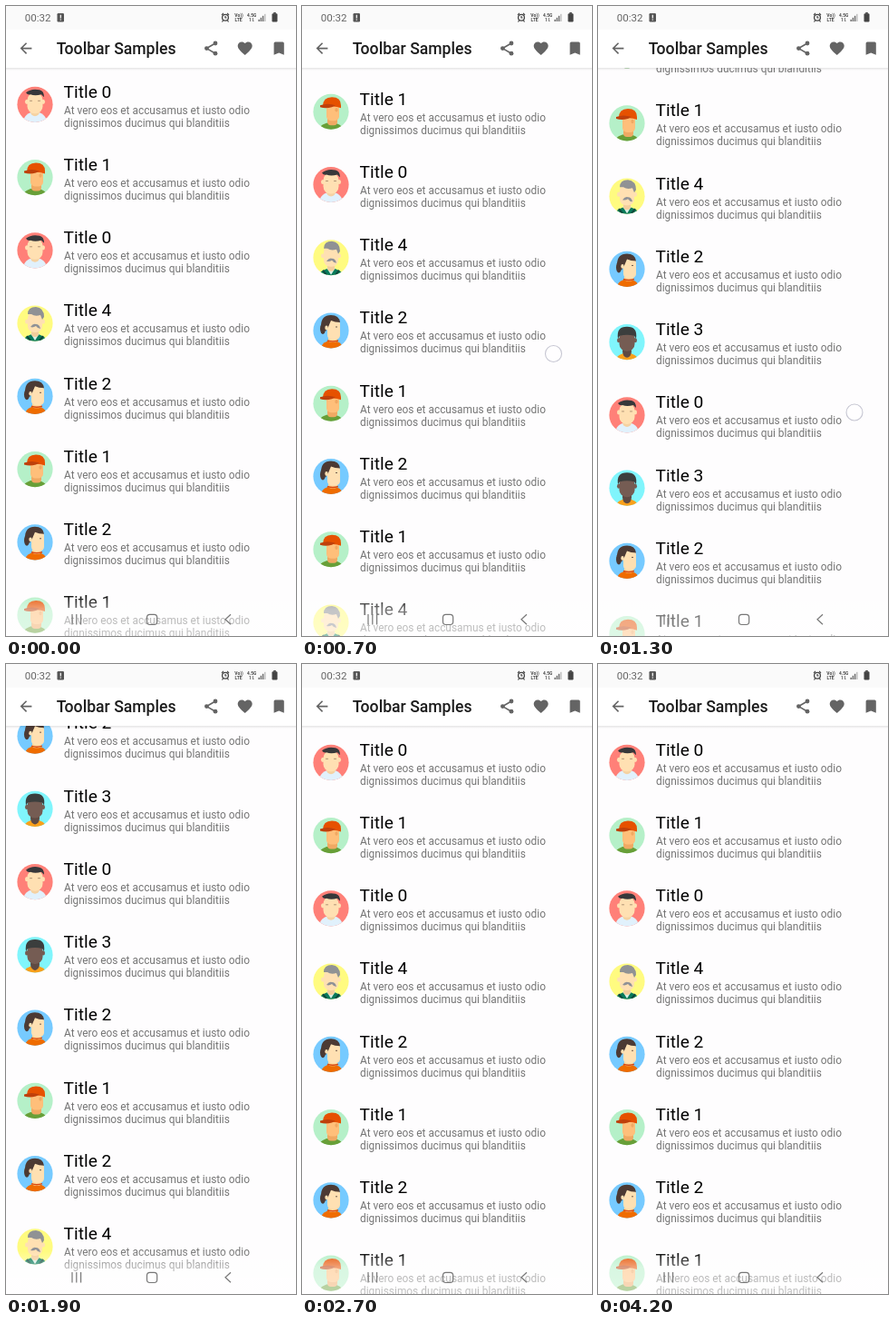
Animation, 320 px wide and 693 px high, one loop 5000 ms. Source, as an HTML page with a canvas:

```html
<!DOCTYPE html>
<html lang="en">
<head>
<meta charset="utf-8">
<title>Toolbar Samples</title>
<style>
  html, body { margin: 0; width: 100%; height: 100%; overflow: hidden; background: #fff; }
  canvas { display: block; width: 320px; height: 693px; }
</style>
</head>
<body>
<canvas id="stage"></canvas>
<script>
const W = 320, H = 693, LOOP = 5000, STEP = 100;
const PITCH = 80.25, LIST_TOP = 68, FIRST_BASELINE = 100.6;
const ROWS = [0, 1, 0, 4, 2, 1, 2, 1, 4, 1, 4, 2, 3, 0, 3, 2, 1, 2, 4, 3];
const ICON = '#646464';

const canvas = document.getElementById('stage');
const dpr = window.devicePixelRatio || 1;
canvas.width = W * dpr;
canvas.height = H * dpr;
const ctx = canvas.getContext('2d');
ctx.scale(dpr, dpr);

// Scroll offset every STEP ms: two swipes up, then a fling back to the top.
const SCROLL_START = 400;
const SCROLL = [
  0, 5, 25, 72.3, 190, 360, 500, 600, 665, 701.6, 740, 800,
  850, 885, 903, 911.9, 911.9, 850, 740, 560, 371.7, 205, 80, 0
];
// A finger holds the list between these times; y is its place at scroll s.
const TOUCHES = [
  { from: 500, to: 800, x: 277.5, y: 382.5, s: 72.3 },
  { from: 1300, to: 1400, x: 283, y: 447, s: 701.6 },
  { from: 2000, to: 2200, x: 280, y: 300, s: 911.9 }
];

function scrollAt(t) {
  const i = Math.floor((t - SCROLL_START) / STEP);
  return SCROLL[i] || 0;
}

function fillRect(color, x, y, w, h) {
  ctx.fillStyle = color;
  ctx.fillRect(x, y, w, h);
}

function ellipse(color, x, y, rx, ry = rx) {
  ctx.fillStyle = color;
  ctx.beginPath();
  ctx.ellipse(x, y, rx, ry, 0, 0, Math.PI * 2);
  ctx.fill();
}

function rounded(color, x, y, w, h, r) {
  ctx.fillStyle = color;
  ctx.beginPath();
  ctx.roundRect(x, y, w, h, r);
  ctx.fill();
}

function shape(color, d) {
  ctx.fillStyle = color;
  ctx.fill(new Path2D(d));
}

function line(color, width, d) {
  ctx.strokeStyle = color;
  ctx.lineWidth = width;
  ctx.stroke(new Path2D(d));
}

function text(str, x, y, size, color, weight = 400) {
  ctx.font = `${weight} ${size}px Roboto, sans-serif`;
  ctx.fillStyle = color;
  ctx.fillText(str, x, y);
}

function at(x, y, scale, draw) {
  ctx.save();
  ctx.translate(x, y);
  ctx.scale(scale, scale);
  draw();
  ctx.restore();
}

function ears(color, y) {
  ellipse(color, -9, y, 2, 2.6);
  ellipse(color, 9, y, 2, 2.6);
}

const AVATARS = [
  { back: '#ff8078', draw() {
    ellipse('#e1f1fc', 0, 20, 13, 12);
    ellipse('#f5d2a2', 0, 8, 5, 5);
    ears('#ffe0b2', -3);
    rounded('#ffe0b2', -8.5, -13, 17, 23, 8);
    shape('#37383a', 'M-10-13Q-4-18 5-16Q10-15 10-8L7-11Q0-9-5-11Q-8-10-10-13Z');
    line('#a08468', 0.8, 'M-6-4h3M3-4h3');
  } },
  { back: '#b5f0c8', draw() {
    ellipse('#689f38', 0, 20, 13, 8);
    rounded('#f0a963', -4, 0, 11, 15, 4);
    rounded('#ffbf7a', -5, -10, 14, 20, 5);
    shape('#e65100', 'M-9-6Q-9-16 1-16Q11-16 11-7V-4Q4-7-4-5Z');
    shape('#bf400b', 'M-12-7Q-4-10 5-7L1-5Q-6-3-12-5Z');
    ellipse('#f0a963', 6, -2, 1.6, 2.2);
  } },
  { back: '#76caff', draw() {
    ellipse('#ef6c00', 1, 19, 11.5, 8);
    ellipse('#4c3a34', -9, -2, 3, 6);
    rounded('#ffd699', -3, 0, 10, 13, 3);
    rounded('#ffe0b2', -4, -12, 14, 22, 5);
    shape('#4c3a34', 'M-11-5Q-11-17 0-17Q9-17 10-9Q4-9 0-11L-3-4L-6 1Z');
    ellipse('#ffe0b2', -5, -3, 1.7, 2.4);
    line('#d94a10', 1.5, 'M-4 11Q2 13 8 11');
    line('#4c3a34', 0.8, 'M5-4h2');
  } },
  { back: '#80f5fc', draw() {
    ellipse('#f9a01b', 0, 20, 12, 8);
    ellipse('#5f4a43', 0, 10, 5, 7);
    ears('#755c53', -2);
    rounded('#755c53', -8.5, -12, 17, 22, 8);
    shape('#3b3e3d', 'M-10-4Q-12-17 0-17Q12-17 10-4L8-7Q0-9-8-7Z');
  } },
  { back: '#fffb80', draw() {
    ellipse('#087a5a', 0, 20, 13, 8);
    shape('#d9eee5', 'M-5 11L0 19L5 11Z');
    line('#10453b', 2, 'M-9 14l4 5M9 14l-4 5');
    rounded('#f3cd9c', -4, 4, 8, 11, 4);
    ears('#ffe0b2', -2);
    rounded('#ffe0b2', -8, -13, 16, 23, 7);
    shape('#909294', 'M-8-10Q-8-18 1-18Q10-17 10-7L8-4L6-9Q0-7-4-10Z');
    shape('#8f9196', 'M-5 4Q-2 0 1 1Q5 1 6 6Q3 6 1 3Q-2 5-5 4Z');
  } }
];

function drawAvatar(kind, y) {
  at(32, y, 1, () => {
    ellipse(AVATARS[kind].back, 0, 0, 19.6);
    ctx.beginPath();
    ctx.arc(0, 0, 19.6, 0, Math.PI * 2);
    ctx.clip();
    AVATARS[kind].draw();
  });
}

function drawList(scroll) {
  ROWS.forEach((kind, i) => {
    const y = FIRST_BASELINE + i * PITCH - scroll;
    if (y < 20 || y > H + 20) return;
    drawAvatar(kind, y + 7.7);
    text('Title ' + kind, 63.6, y, 19.2, '#000');
    text('At vero eos et accusamus et iusto odio', 64, y + 18, 11.9, '#757575');
    text('dignissimos ducimus qui blanditiis', 64, y + 32, 11.9, '#757575');
  });
}

function drawStatusBar() {
  fillRect('#fafafa', 0, 0, W, 26);
  text('00:32', 20.7, 17, 11.6, '#666');
  rounded('#555', 56.5, 8, 7.5, 9.5, 1.2);
  fillRect('#fff', 59.7, 9.7, 1.2, 3.8);
  fillRect('#fff', 59.7, 14.5, 1.2, 1.2);

  ctx.strokeStyle = '#444';
  ctx.lineWidth = 1.3;
  ctx.beginPath();
  ctx.arc(242, 12.8, 3.4, 0, Math.PI * 2);
  ctx.stroke();
  line('#444', 1.2, 'M238 9.8l2-2M246 9.8l-2-2M242 11v2h1.5M239.5 16l-1 1.5M244.5 16l1 1.5');
  text('Vo))', 252.3, 11.5, 5, '#444', 700);
  text('LTE', 252.5, 17, 5, '#444', 700);
  text('4.5G', 266, 11.5, 4.8, '#444', 700);
  line('#777', 0.9, 'M269.5 17v-4l-1 1M272.5 13v4l1-1');
  for (let i = 0; i < 4; i++) {
    const h = 2.2 + i * 2;
    fillRect(i < 3 ? '#666' : '#bbb', 278.5 + i * 2.2, 17 - h, 1.4, h);
  }
  rounded('#444', 293.5, 8.2, 6, 9.3, 1.2);
  fillRect('#444', 295.2, 7, 2.6, 1.5);
}

function drawToolbar() {
  const shadow = ctx.createLinearGradient(0, 68, 0, 71);
  shadow.addColorStop(0, 'rgba(0,0,0,.1)');
  shadow.addColorStop(1, 'rgba(0,0,0,0)');
  fillRect(shadow, 0, 68, W, 3);
  fillRect('#fff', 0, 26, W, 42);
  text('Toolbar Samples', 55.7, 53, 17.6, '#1c1c1c', 500);

  const size = 0.8;
  const icon = (x, draw) => at(x - 12 * size, 46.6 - 12 * size, size, draw);
  icon(22, () => shape(ICON,
    'M20 11H7.83l5.59-5.59L12 4l-8 8 8 8 1.41-1.41L7.83 13H20z'));
  icon(226.2, () => {
    line(ICON, 2, 'M18 5L6 12L18 19');
    [[18, 5], [6, 12], [18, 19]].forEach(([x, y]) => ellipse(ICON, x, y, 3));
  });
  icon(263.7, () => shape(ICON,
    'M12 21.35l-1.45-1.32C5.4 15.36 2 12.28 2 8.5 2 5.42 4.42 3 7.5 3c1.74 0 3.41.81 4.5 2.09' +
    'C13.09 3.81 14.76 3 16.5 3 19.58 3 22 5.42 22 8.5c0 3.78-3.4 6.86-8.55 11.54z'));
  icon(301.2, () => shape(ICON, 'M17 3H7Q5 3 5 5V21L12 18L19 21V5Q19 3 17 3Z'));
}

function drawNavBar() {
  const fade = ctx.createLinearGradient(0, 646, 0, H);
  fade.addColorStop(0, 'rgba(255,255,255,0)');
  fade.addColorStop(0.38, 'rgba(255,255,255,.47)');
  fade.addColorStop(1, 'rgba(255,255,255,.55)');
  fillRect(fade, 0, 646, W, H - 646);

  line('#777', 1.2, 'M73 669v11.5M77.8 669v11.5M82.6 669v11.5M248 669.3l-6 5.5 6 5.5');
  ctx.beginPath();
  ctx.roundRect(155.5, 669.3, 11.2, 11.2, 3.2);
  ctx.stroke();
}

function drawTouch(t, scroll) {
  const touch = TOUCHES.find(p => t >= p.from && t <= p.to);
  if (!touch) return;
  const y = touch.y + touch.s - scroll;
  ellipse('rgba(255,255,255,.6)', touch.x, y, 9);
  ctx.strokeStyle = '#c6c6d2';
  ctx.lineWidth = 1.1;
  ctx.stroke();
}

function render(t) {
  const scroll = scrollAt(t);
  fillRect('#fefdfe', 0, 0, W, H);
  ctx.save();
  ctx.beginPath();
  ctx.rect(0, LIST_TOP, W, H);
  ctx.clip();
  drawList(scroll);
  ctx.restore();
  drawToolbar();
  drawStatusBar();
  drawNavBar();
  drawTouch(t, scroll);
}

const start = performance.now();
function frame() {
  const t = (performance.now() - start) % LOOP;
  render(Math.floor(t / STEP) * STEP);
  requestAnimationFrame(frame);
}
frame();
</script>
</body>
</html>
```
